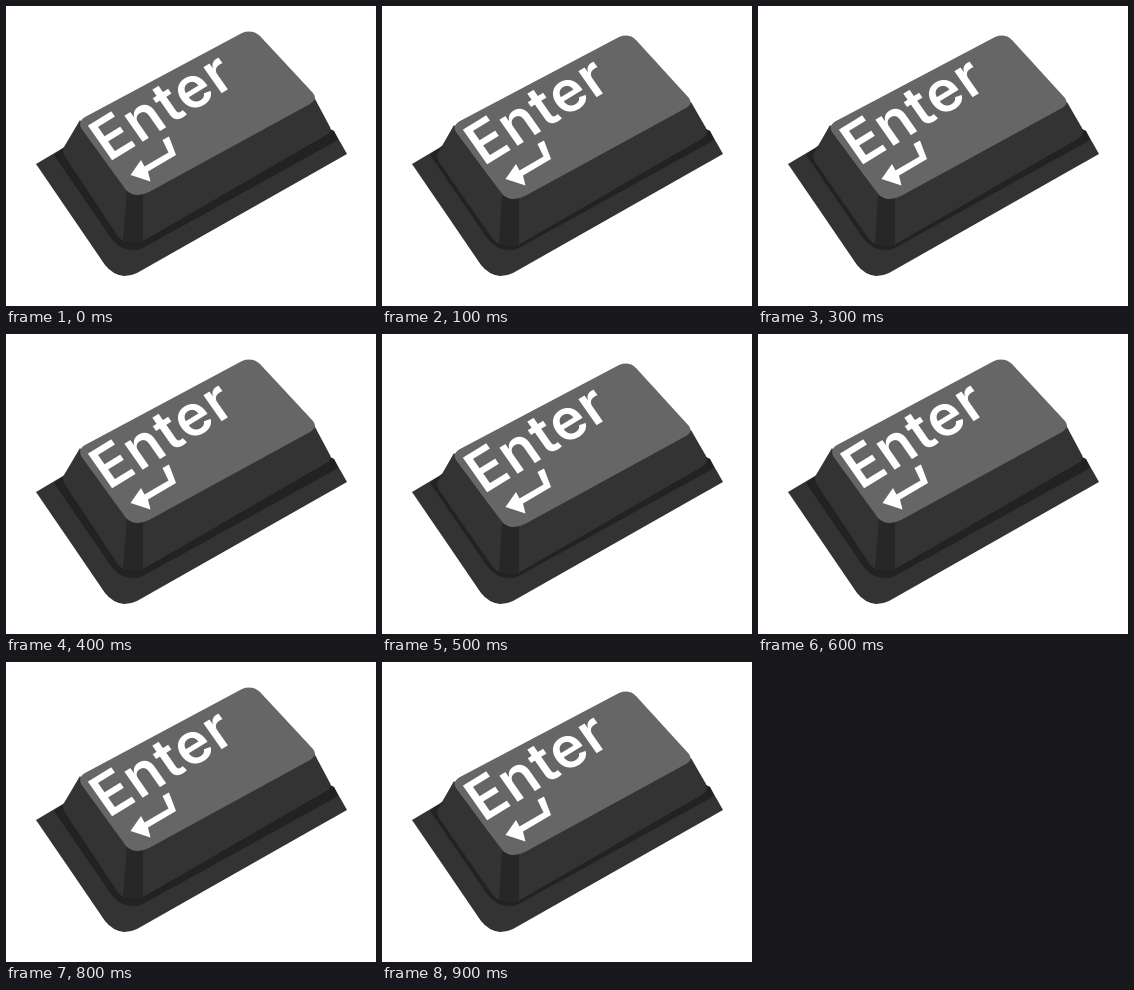
An HTML page that plays this animation: 370 px wide and 300 px high, repeating every 1000 ms.

```html
<!DOCTYPE html>
<html lang="en">
<head>
<meta charset="utf-8">
<style>
html, body { margin: 0; height: 100%; overflow: hidden; background: #fff; }
svg { display: block; }
text { font: 600 58px Inter, "Liberation Sans", sans-serif; letter-spacing: 1px; }
</style>
</head>
<body>
<svg width="370" height="300" viewBox="0 0 370 300">
  <path fill="#333" d="M30 158L62 139L300 112L328 125L341 148L131 267Q125 270 118 270Q107 269 99 259Z"/>
  <path fill="#222" d="M48 149L64 137L300 112L328 125L332 134L137 242Q129 246 120 243Q112 241 105 232Z"/>
  <path id="side" fill="#333"/>
  <path id="left" fill="#333"/>
  <path id="corner" fill="#272727"/>
  <path id="top" fill="#666"/>
  <g id="label" fill="#fff">
    <text transform="translate(102.5 156.5) rotate(-31.5) skewX(3.5)">Enter</text>
    <path d="M156.500 134L163 130.500L170 149L142 165.500L144.500 175.500L124.500 169L135 154L138.500 160.500L162.500 146.500Z"/>
  </g>
</svg>
<script>
const $ = id => document.getElementById(id);
const poses = [
  {
    top: "M79 111L236 27Q246 23 254 30L307 87Q312 93 304 98L143 186Q129 193 120 184L75 122Q72 115 79 111Z",
    side: "M130 180L308 91L324 121Q326 125 322 128L137 235L118 235Z",
    left: "M74 114L58 141Q56 145 58 149L109 226Q113 233 118 235L122 186Z",
    corner: "M121 184L117 234Q126 239 137 235L137 187Z",
    shift: "translate(0 0)"
  },
  {
    top: "M78 115L237 31Q247 27 254 34L307 92Q311 98 304 102L143 190Q129 197 120 188L74 126Q70 119 78 115Z",
    side: "M130 184L309 96L324 122Q327 128 321 132L137 238.500L118 238Z",
    left: "M72 119L56 147Q54 151 57 156L108 229Q112 236 118 238L121 190Z",
    corner: "M120 188L117 237Q126 242 137 238.500L137 191Z",
    shift: "translate(-1 4)"
  }
];

function draw() {
  const pose = poses[Math.floor(performance.now() % 1000 / 100) % 2];
  for (const id of ["top", "side", "left", "corner"]) $(id).setAttribute("d", pose[id]);
  $("label").setAttribute("transform", pose.shift);
  requestAnimationFrame(draw);
}
draw();
</script>
</body>
</html>
```
